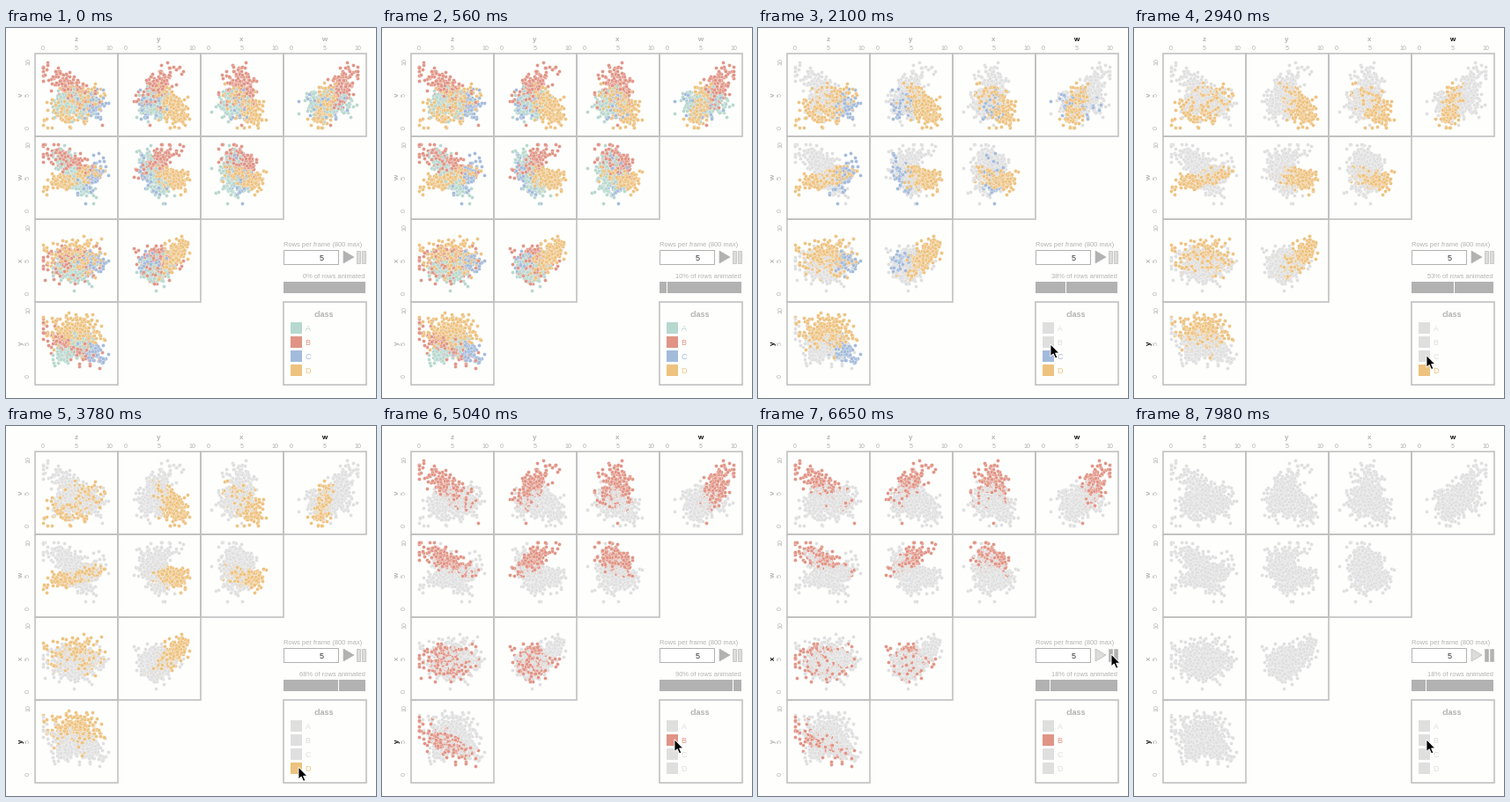
A matplotlib script for the animation above (8 s loop, 420 px wide and 420 px high).

```python
import numpy as np
import matplotlib.pyplot as plt
from matplotlib.animation import FuncAnimation
from matplotlib.patches import Polygon, Rectangle

SIZE, PX = 420, 0.72              # stage in pixels, points per pixel
INTERVAL, FRAMES, STEP = 64, 125, 70
CELL, LEFT, TOP = 94, 32.5, 28.5
UNIT = 7.5                        # pixels per data unit
ROWS, BLOCK = 800, 40
NAMES, KEYS = "vwxyz", "ABCD"
INK, FAINT, FRAME = "#b2b2b2", "#dcdcdc", "#c0c0c0"
COLORS = [np.array(plt.matplotlib.colors.to_rgb(c))
          for c in ("#b7d8cf", "#e19485", "#a3bbdb", "#eec27f")]
GREY = np.full(3, .873)

# visited control and the step at which it is clicked
CLICKS = [("A", 18), ("B", 26), ("C", 38), ("D", 57), ("B", 66), ("pause", 94), ("B", 111)]
PAUSE_STEP = dict(CLICKS)["pause"]

# (v, w, x, y, z) of each class from two normal variables
CLUSTERS = [
    lambda t, u: (3.8 + .5 * u, 5.6 - 1.5 * t, 3.7 + .8 * u, 4.2 + .7 * t, 4.5 + 1.2 * t),
    lambda t, u: (5.7 + 1.3 * t, 7.2 + .8 * t - .6 * u, 4.7 + u, 4.3 + .9 * t, 4.4 - 1.8 * t),
    lambda t, u: (3.6 + .2 * u, 5 + 1.3 * t, 4.9 + .4 * u, 4 - .7 * t, 7.3 + .6 * t),
    lambda t, u: (3.5 + .5 * t - .8 * u, 5 + .5 * t - .2 * u, 5.3 + u, 6.5 + u, 5 + 1.7 * t),
]
SPREAD = (.9, .5, .7, .8, .8)

rng = np.random.default_rng(12)
classes = rng.choice(4, ROWS, p=(.29, .25, .14, .32))
t, u = rng.normal(size=(2, ROWS))
data = np.array([CLUSTERS[c](a, b) for c, a, b in zip(classes, t, u)])
data = np.clip(data + SPREAD * rng.normal(size=data.shape), 0, 10)
jitter = rng.random(ROWS)

panels = [(r, c) for r in range(4) for c in range(4 - r)]
px = np.array([42 + CELL * c + UNIT * data[:, 4 - c] for r, c in panels])
py = np.array([113 + CELL * r - UNIT * data[:, r] for r, c in panels])

plt.rcParams["font.family"] = "Liberation Sans"
fig = plt.figure(figsize=(4.2, 4.2), dpi=100, facecolor="#fefffd")
ax = fig.add_axes([0, 0, 1, 1])
ax.set(xlim=(0, SIZE), ylim=(SIZE, 0))
ax.axis("off")


def text(x, y, s, size=7.5, color=INK, **kw):
    return ax.text(x, y, s, fontsize=size * PX, color=color, **kw)


def box(x, y, w, h, fill="none", edge="none", lw=1.0, z=1):
    return ax.add_patch(Rectangle((x, y), w, h, fc=fill, ec=edge, lw=lw * PX, zorder=z))


def shape(points, fill, edge, lw, z=1):
    return ax.add_patch(Polygon(points, closed=True, fc=fill, ec=edge, lw=lw * PX, zorder=z))


# grid and axes
for r, c in panels + [(3, 3)]:
    box(LEFT + CELL * c, TOP + CELL * r, CELL, CELL, edge=FRAME, lw=1.6)
column_labels, row_labels = [], []
for i in range(4):
    mid = CELL * i
    column_labels.append(text(79.5 + mid, 15, NAMES[4 - i], 8, weight="bold", ha="center"))
    row_labels.append(text(17.5, 75.5 + mid, NAMES[i], 8, weight="bold",
                           ha="center", va="center", rotation=90))
    for v in (0, 5, 10):
        text(42 + mid + UNIT * v, 24.7, str(v), 7.2, ha="center")
        text(25.6, 113 + mid - UNIT * v, str(v), 7.2, ha="center", va="center", rotation=90)

# controls
text(315, 247.8, "Rows per frame (800 max)")
box(315, 252, 62, 16, "white", INK)
text(358.5, 264, "5", 9, "#333333", ha="center")
play = shape([(383, 253), (383, 267), (395, 260)], INK, INK, .6)
bars = [box(x, 253, 4, 14, FAINT, INK, .6) for x in (397.5, 403.5)]
status = text(407.5, 283.8, "", ha="right")
box(315, 288, 93, 12.5, INK)
marker = box(0, 288, 1, 12.5, "white", z=2)

# legend
text(361, 328, "class", 9, weight="bold", ha="center")
swatches = [box(323, 334 + 16 * i, 13, 13) for i in range(4)]
keys = [text(339.5, 344 + 16 * i, k, 9) for i, k in enumerate(KEYS)]

# dots are drawn in stacked blocks so that raised rows cover the others
layers = [[ax.plot([], [], "o", ms=4 * PX, mec=(1, 1, 1, .6), mew=.45 * PX, zorder=3)[0]
           for _ in COLORS] for _ in range(ROWS // BLOCK)]

ARROW = np.array([(0, 0), (0, 14), (3.2, 11), (5.6, 16.2), (7.9, 15.2), (5.6, 10.2), (10, 10.2)])
pointer = shape(ARROW, "black", "white", .9, z=6)


def make_toggles():
    """Each click on a legend key flips its class: (step, class, now on)."""
    on, toggles = [True] * 4, []
    for name, step in CLICKS:
        if name in KEYS:
            c = KEYS.index(name)
            on[c] = not on[c]
            toggles.append((step, c, on[c]))
    return toggles


TOGGLES = make_toggles()


def stacking(step):
    """Animated rows and classes switched on rise, classes switched off sink."""
    rank = jitter - 1
    for s in range(step + 1):
        if s <= PAUSE_STEP:
            rows = (10 * s + np.arange(10)) % ROWS
            rank[rows] = s + jitter[rows]
        for when, c, on in TOGGLES:
            if when == s:
                members = classes == c
                rank[members] = jitter[members] + (s if on else s - 1000)
    return np.argsort(rank)


def level(c, step):
    value = 1.0
    for when, cls, on in TOGGLES:
        if cls == c:
            value += (on - value) * np.clip((step - when) / 3, 0, 1)
    return value


def place(name):
    if name == "pause":
        return np.array([401, 259])
    return np.array([332, 340 + 15.7 * KEYS.index(name)])


def pointer_tip(step):
    tip = np.array([440, 300])
    for name, click in CLICKS:
        u = np.clip((step - click + 10) / 7, 0, 1)
        tip = tip + (place(name) - tip) * u * u * (3 - 2 * u)
    return tip


def highlight(labels, active):
    for i, label in enumerate(labels):
        label.set_color("black" if i == active else INK)


def update(frame):
    step = (frame + 1) * INTERVAL // STEP
    levels = [level(c, step) for c in range(4)]
    colors = [COLORS[c] * on + GREY * (1 - on) for c, on in enumerate(levels)]
    for color, swatch, key in zip(colors, swatches, keys):
        swatch.set_facecolor(color)
        key.set_color(color)

    order = stacking(step)
    for i, layer in enumerate(layers):
        rows = order[i * BLOCK:(i + 1) * BLOCK]
        for c, line in enumerate(layer):
            mine = rows[classes[rows] == c]
            line.set_data(px[:, mine].ravel(), py[:, mine].ravel())
            line.set_markerfacecolor(colors[c])

    percent = round(1.25 * min(step, PAUSE_STEP) + .3) % 100
    status.set_text(f"{percent}% of rows animated")
    marker.set_x(314 + .93 * percent)
    marker.set_visible(percent > 0)
    paused = step >= PAUSE_STEP
    play.set_facecolor(FAINT if paused else INK)
    for bar in bars:
        bar.set_facecolor(INK if paused else FAINT)

    tip = pointer_tip(step)
    pointer.set_xy(ARROW + tip)
    col, row = (tip - (LEFT, TOP)) // CELL
    inside = col < 4 and row < 4
    highlight(column_labels, col if inside else None)
    highlight(row_labels, row if inside else None)


anim = FuncAnimation(fig, update, frames=FRAMES, init_func=lambda: update(0),
                     interval=INTERVAL, repeat=True, repeat_delay=0, blit=False)
plt.show()
```
